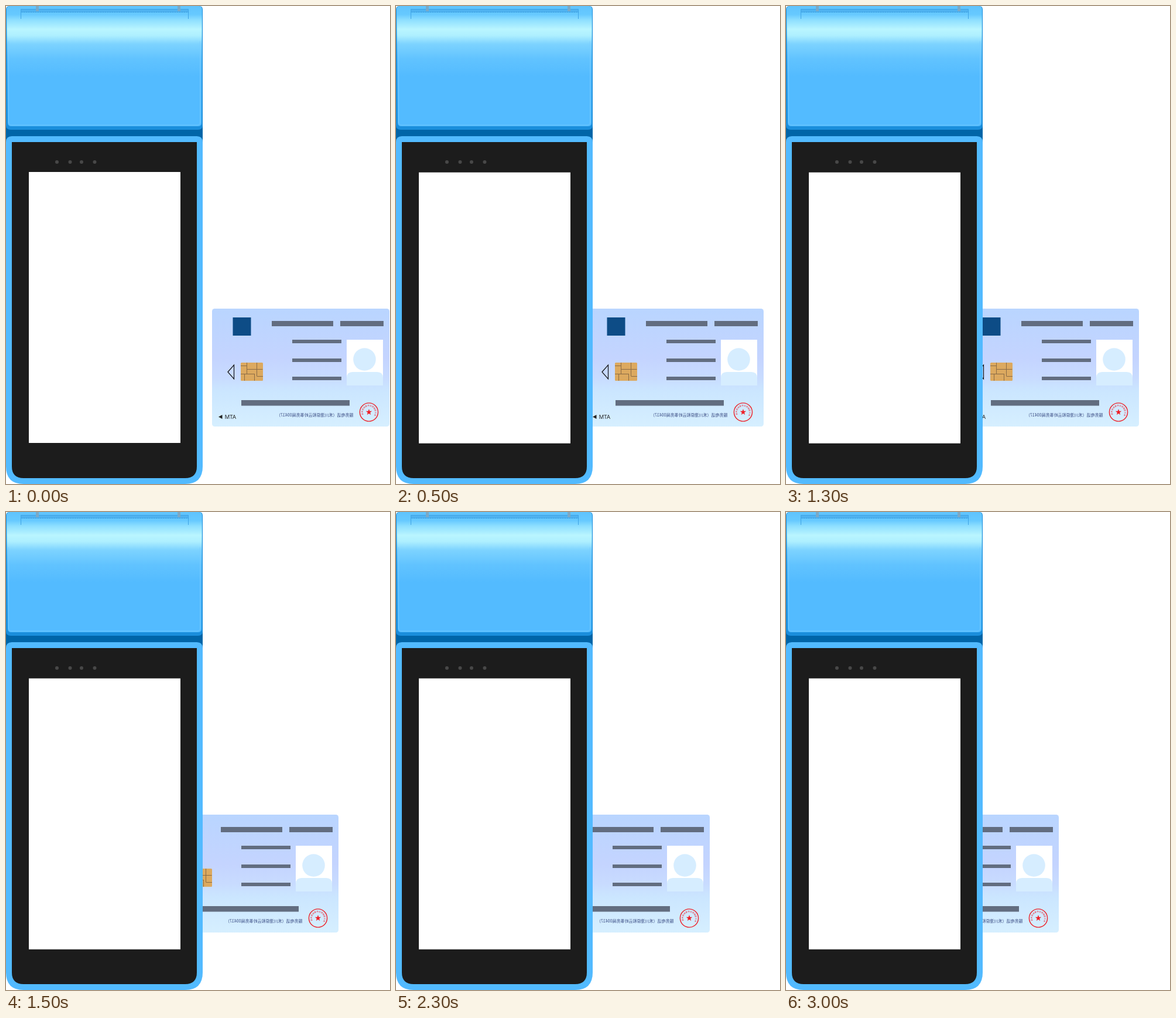
Animation of 656x815 px, one loop 3.5 s. Source, as an HTML page:

```html
<!DOCTYPE html>
<html lang="zh">
<head>
<meta charset="utf-8">
<style>
  html, body { margin: 0; width: 100%; height: 100%; overflow: hidden; background: #fff; }
  svg { display: block; width: 656px; height: 815px; }
  text { font-family: "Noto Sans CJK SC", "Noto Sans CJK", "Noto Sans", sans-serif; }
</style>
</head>
<body>
<svg viewBox="0 0 656 815">
  <defs>
    <linearGradient id="lid" gradientUnits="userSpaceOnUse" x1="0" y1="0" x2="0" y2="120">
      <stop offset="0" stop-color="#5fc3fd"/>
      <stop offset=".12" stop-color="#66c9ff"/>
      <stop offset=".2" stop-color="#8edfff"/>
      <stop offset=".33" stop-color="#b9f5ff"/>
      <stop offset=".42" stop-color="#aeefff"/>
      <stop offset=".54" stop-color="#7dd3ff"/>
      <stop offset=".75" stop-color="#61c3ff"/>
      <stop offset="1" stop-color="#53bbff"/>
    </linearGradient>
    <linearGradient id="paper" x1="0" y1="0" x2="0" y2="1">
      <stop offset="0" stop-color="#b9d5ff"/>
      <stop offset=".42" stop-color="#c4d4ff"/>
      <stop offset=".58" stop-color="#c8dbff"/>
      <stop offset=".7" stop-color="#cbe6ff"/>
      <stop offset="1" stop-color="#d6efff"/>
    </linearGradient>
    <path id="arc" d="M-8.3 5.8A10.1 10.1 0 1 1 8.3 5.8"/>
  </defs>

  <g id="card">
    <rect x="352" y="516" width="303" height="201" rx="4.5" fill="url(#paper)"/>
    <rect x="387.5" y="531" width="31" height="31" fill="#0d4c86"/>
    <path fill="#626d80" d="M454 537h105v9h-105zM571 537h74v9h-74zM489 569h84v6h-84zM489 601h84v6h-84zM489 632h84v6h-84zM402 672h185v9.500h-185z"/>
    <rect x="582" y="569" width="62" height="78" fill="#fff"/>
    <g fill="#d6edff">
      <circle cx="612.5" cy="602.5" r="19.300"/>
      <path d="M582 647v-13q0-10 10-10h42q10 0 10 10v13z"/>
    </g>
    <rect x="401" y="608" width="38" height="31" rx="1.500" fill="#dca95f"/>
    <path fill="none" stroke="#8b6b45" d="M401 613.500h10M411.500 608v19M401 627.500h23M411.500 619.500h27M428.500 608v23M428.500 631.500h10.500M407.500 627v12M424.500 627v12"/>
    <path fill="none" stroke="#111" stroke-width="1.200" d="M379 624l10.500-12v24z"/>
    <path fill="#222" d="M363 700.500l6.500-3.500v7z"/>
    <text transform="matrix(-1 0 0 1 393 704)" font-size="9.500" fill="#222" style="font-family:'Noto Sans',sans-serif">ATM</text>
    <text transform="matrix(-1 0 0 1 593.500 699.500)" font-size="7" fill="#35477f">服务电话（禾川澄原和云岭事务局00417）</text>
    <g transform="matrix(-1 0 0 1 620 692.500)" fill="#ee2028">
      <circle r="15.600" fill="none" stroke="#ee2028" stroke-width="1.400"/>
      <path d="M0-5.500l1.300 3.700 3.900.1-3.100 2.400 1.100 3.800L0 2.200l-3.200 2.300 1.100-3.800-3.100-2.400 3.900-.1z"/>
      <text font-size="3.500"><textPath href="#arc">禾川澄原和云岭事务局专用</textPath></text>
    </g>
  </g>

  <g id="device">
    <path fill="#0065a8" d="M0 190h336v45H0z"/>
    <path fill="#1a8edc" d="M0 6q0-6 6-6h324q6 0 6 6v197q0 8-8 8H8q-8 0-8-8z"/>
    <path fill="url(#lid)" d="M1 6q0-6 6-6h322q6 0 6 6l-1 193q0 6-6 6H9q-6 0-6-6z"/>
    <path fill="none" stroke="#7accff" stroke-opacity=".7" d="M4.500 60v138q0 5 5 5h317q5 0 5-5V60"/>
    <path fill="#4fb2f0" d="M25 5h287v5H25z"/>
    <path fill="none" stroke="#2f93d6" stroke-dasharray="2 1" d="M25 10.500h287"/>
    <path fill="none" stroke="#3fa3e4" d="M25.500 22V5.500h286V22"/>
    <path fill="#79a9c8" d="M51 0h5v9h-5zM293 0h5v9h-5z"/>
    <path fill="#52baff" d="M0 232q0-10 10-10h316q10 0 10 10v553q0 30-30 30H30q-30 0-30-30z"/>
    <path fill="#1c1c1c" d="M10 232h316v553q0 20-20 20H30q-20 0-20-20z"/>
    <g fill="#484848">
      <circle cx="87" cy="266" r="3"/><circle cx="109.500" cy="266" r="3"/>
      <circle cx="129" cy="266" r="3"/><circle cx="151.500" cy="266" r="3"/>
    </g>
    <rect id="screen" x="39" y="283" width="259" height="462" fill="#fff"/>
  </g>
</svg>
<script>
  const STEP = 500;
  const shifts = [0, 27, 52, 87, 119, 148, 189];
  const card = document.getElementById('card');
  const screen_ = document.getElementById('screen');

  function draw() {
    const step = Math.floor(performance.now() / STEP) % shifts.length;
    card.setAttribute('transform', `translate(${-shifts[step]} 0)`);
    screen_.setAttribute('y', step ? 283.7 : 283);
    requestAnimationFrame(draw);
  }
  draw();
</script>
</body>
</html>
```
